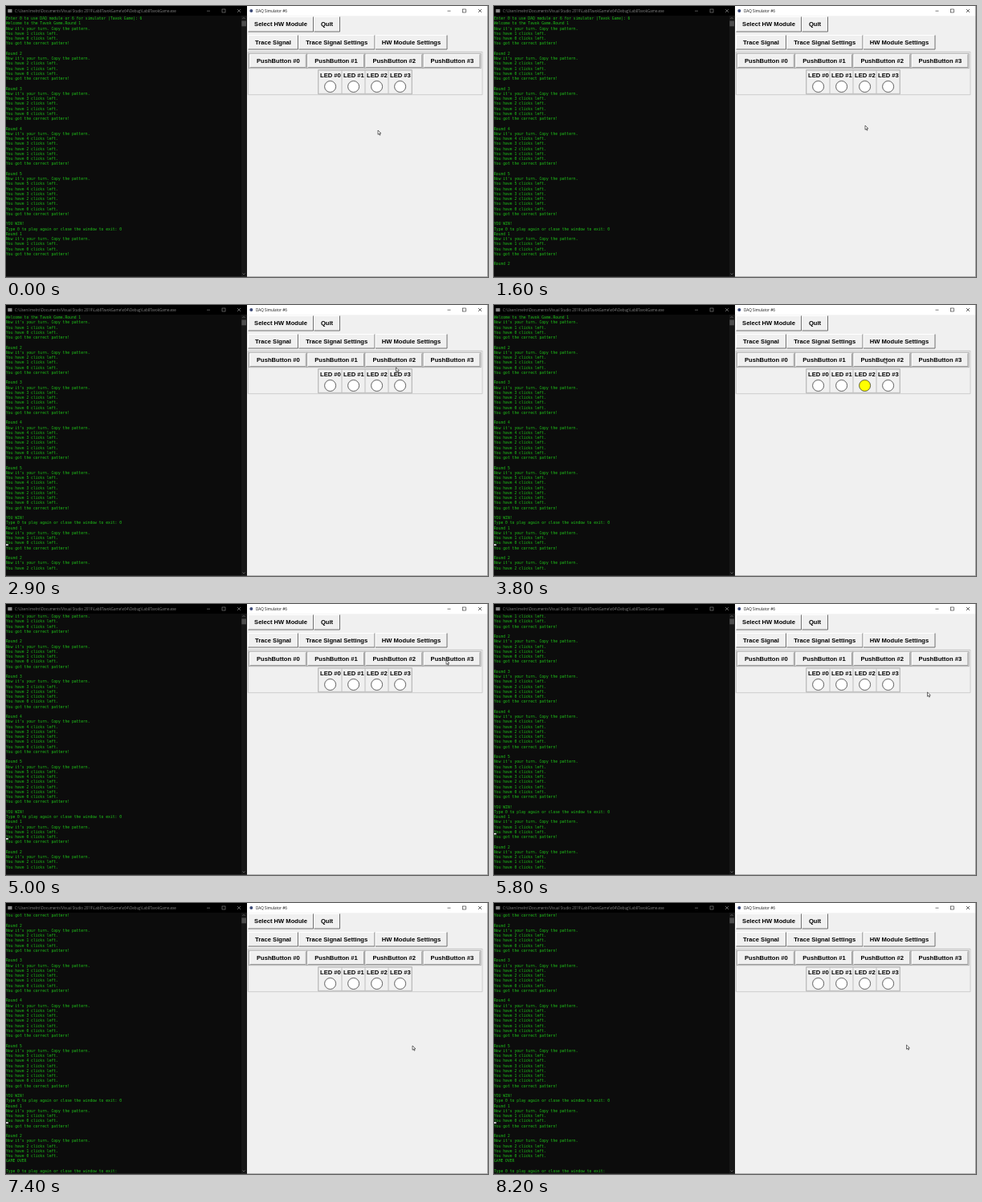
Write an HTML page with a canvas that moves like this. It is 600 px wide and 338 px high and loops after 8.3 s.

```html
<!DOCTYPE html>
<html lang="en">
<head>
<meta charset="utf-8">
<title>DAQ Simulator</title>
<style>
html, body { margin: 0; width: 100%; height: 100%; overflow: hidden; background: #0c0c0c; }
canvas { display: block; width: 600px; height: 338px; }
</style>
</head>
<body>
<canvas id="stage" width="600" height="338"></canvas>
<script>
const ctx = document.getElementById('stage').getContext('2d');
const LOOP = 8300, STEP = 100, ROW = 6.25, ROWS = 52;
const MONO = '"DejaVu Sans Mono", monospace';
const UI = '"Open Sans", sans-serif';
const BOLD = '"Liberation Sans", Arial, sans-serif';

// Console log
const clicks = n => Array.from({ length: n + 1 }, (_, i) => `You have ${n - i} clicks left.`);
const turn = n => ["Now it's your turn. Copy the pattern.", ...clicks(n)];
const won = n => [...turn(n), 'You got the correct pattern!', ''];
const again = 'Type 0 to play again or close the window to exit: ';
const log = [
  'Enter 0 to use DAQ module or 6 for simulator (Tavok Game): 6',
  'Welcome to the Tavok Game.Round 1', ...won(1)
];
for (let n = 2; n <= 5; n++) log.push('Round ' + n, ...won(n));
log.push('YOU WIN!', again + '0', 'Round 1', ...won(1), 'Round 2', ...turn(2), 'GAME OVER', '', again);

// [time, lines printed so far]
const prints = [[0, 48], [100, 50], [1900, 52], [4100, 53], [5800, 54], [5900, 55], [7400, 57]];
// [led, on, off]
const flashes = [[2, 100, 500], [1, 1000, 1500], [2, 3600, 4100], [3, 5400, 5800], [1, 6200, 7400]];
const ledColors = ['#00ff00', '#ff0000', '#ffff00', '#0000ff'];
// [button, down, up]
const presses = [[2, 3500, 3700], [3, 5300, 5500]];
// [time, x, y] of the pointer tip
const path = [
  [0, 463, 155], [1000, 463, 155], [1200, 462, 149], [1600, 462, 149], [2000, 480, 102],
  [2700, 482, 82], [2900, 485.5, 78], [3300, 486, 67], [4100, 486, 67], [4600, 548, 70],
  [5500, 548, 70], [6100, 531, 150], [6500, 531, 150], [6900, 506, 178], [7400, 506, 178],
  [8200, 513.5, 177], [8300, 513.5, 177]
];
const active = (list, id, t) => list.some(([k, a, b]) => k === id && t >= a && t < b);

function box(x, y, w, h, color) {
  ctx.fillStyle = color;
  ctx.fillRect(x, y, w, h);
}

// Laid out large and scaled down so that small sizes keep exact spacing
function text(str, x, y, size, font, color, align = 'left') {
  ctx.save();
  ctx.translate(x, y);
  ctx.scale(size / 50, size / 50);
  ctx.font = (font === BOLD ? 'bold ' : '') + '50px ' + font;
  ctx.textAlign = align;
  ctx.fillStyle = color;
  ctx.fillText(str, 0, 0);
  ctx.restore();
}

function stroke(color, width, ...lines) {
  ctx.strokeStyle = color;
  ctx.lineWidth = width;
  ctx.beginPath();
  for (const pts of lines) pts.forEach(([x, y], i) => i ? ctx.lineTo(x, y) : ctx.moveTo(x, y));
  ctx.stroke();
}

function bevel(x, y, w, h, light, dark, width = 0.8) {
  const r = x + w, b = y + h;
  stroke(light, width, [[x, b], [x, y], [r, y]]);
  stroke(dark, width, [[r, y], [r, b], [x, b]]);
}

function windowButtons(x, color) {
  stroke(color, 0.6,
    [[x - 2, 6.2], [x + 2, 6.2]],
    [[x + 36.5, 4], [x + 40.5, 4]], [[x + 36.5, 8.3], [x + 41, 8.3]],
    [[x + 37, 4], [x + 37, 8.3]], [[x + 41, 4], [x + 41, 8.3]]);
  // The close cross sits in its own slot
}

function cross(x, color) {
  stroke(color, 0.7, [[x - 2, 4], [x + 2, 8]], [[x + 2, 4], [x - 2, 8]]);
}

function titleControls(min, max, close, color) {
  stroke(color, 0.6, [[min - 2, 6.2], [min + 2, 6.2]]);
  ctx.strokeRect(max - 2, 4, 4, 4);
  cross(close, color);
}

function drawConsole(t) {
  box(0, 0, 300, 338, '#0c0c0c');
  box(0, 0, 300, 12, '#000');
  box(2.3, 4, 5.2, 4.2, '#8a8a8a');
  text('C:\\Users\\melro\\Documents\\Visual Studio 2019\\Lab8TavokGame\\x64\\Debug\\Lab8TavokGame.exe',
    11, 7.9, 4.45, UI, '#858585');
  titleControls(252, 271, 290, '#8c8c8c');

  const shown = prints.filter(p => p[0] <= t).pop()[1];
  const top = Math.max(0, Math.min(shown, log.length - 1) - ROWS + 1);
  const rowY = i => 12.4 + (i - top) * ROW;
  for (let i = top; i < shown; i++) text(log[i], 0, rowY(i) + 4.8, 4.69, MONO, '#1fc41a');
  if (top) box(0, rowY(46) + 4.7, 2.8, 1.6, '#f2f2f2');

  box(293, 12, 7, 326, '#171717');
  box(293.3, 18.5, 5.7, 6.8, '#4d4d4d');
  stroke('#777', 0.7, [[294.4, 16], [296, 14.4], [297.6, 16]], [[294.4, 333.4], [296, 335], [297.6, 333.4]]);
  box(0, 337.4, 300, 0.6, '#333');
}

function button(label, x, y, w, h) {
  bevel(x + 0.5, y + 0.5, w - 1, h - 1, '#fff', '#6e6e6e', 1);
  text(label, x + w / 2, y + h / 2 + 2.7, 7.6, BOLD, '#000', 'center');
}

function pushButton(i, t) {
  const x = 302.5 + i * 72.2, down = active(presses, i, t);
  ctx.strokeStyle = '#a6a6a6';
  ctx.lineWidth = 0.9;
  ctx.strokeRect(x, 59.3, 72, 18.4);
  bevel(x + 1.2, 60.5, 69.6, 16, down ? '#6e6e6e' : '#fff', down ? '#fff' : '#8a8a8a');
  const d = down ? 0.5 : 0;
  text('PushButton #' + i, x + 36.3 + d, 71.1 + d, 7.6, BOLD, '#000', 'center');
}

function led(i, t) {
  const x = 389 + i * 29;
  bevel(x, 80.3, 29, 29, '#c4c4c4', '#c4c4c4', 0.7);
  text('LED #' + i, x + 14.9, 89.4, 7.6, BOLD, '#000', 'center');
  ctx.beginPath();
  ctx.arc(x + 14.6, 100.5, 7, 0, Math.PI * 2);
  ctx.fillStyle = active(flashes, i, t) ? ledColors[i] : '#fff';
  ctx.fill();
  ctx.strokeStyle = '#222';
  ctx.lineWidth = 0.7;
  ctx.stroke();
}

function drawSimulator(t) {
  box(300, 0, 300, 338, '#f0f0f0');
  box(300, 0, 300, 12.3, '#fff');
  ctx.beginPath();
  ctx.arc(305.3, 6, 2, 0, Math.PI * 2);
  ctx.fillStyle = '#3c4a78';
  ctx.fill();
  text('DAQ Simulator #6', 311, 7.9, 4.65, UI, '#111');
  titleControls(551.5, 570.5, 590, '#222');

  button('Select HW Module', 301, 13, 82, 19.5);
  button('Quit', 383, 13, 33, 19.5);
  button('Trace Signal', 301, 36, 63, 18.5);
  button('Trace Signal Settings', 364, 36, 95.5, 18.5);
  button('HW Module Settings', 459.5, 36, 90, 18.5);

  bevel(301.3, 57.3, 291.7, 53.4, '#bdbdbd', '#cacaca', 0.9);
  bevel(388.6, 79.8, 116.8, 30, '#a8a8a8', '#a8a8a8');
  for (let i = 0; i < 4; i++) {
    pushButton(i, t);
    led(i, t);
  }
  box(599.3, 0, 0.7, 338, '#777');
  box(300, 337.3, 300, 0.7, '#999');
}

function drawPointer(t) {
  const n = path.findIndex(p => p[0] > t);
  const [t0, x0, y0] = path[n - 1], [t1, x1, y1] = path[n];
  const k = (t - t0) / (t1 - t0), e = k * k * (3 - 2 * k);
  ctx.save();
  ctx.translate(x0 + (x1 - x0) * e, y0 + (y1 - y0) * e);
  ctx.beginPath();
  [[0, 0], [0, 5.3], [1.3, 4.2], [2.2, 6.2], [3, 5.8], [2.2, 3.9], [3.9, 3.8]]
    .forEach(([x, y]) => ctx.lineTo(x, y));
  ctx.closePath();
  ctx.fillStyle = '#fff';
  ctx.fill();
  ctx.strokeStyle = '#111';
  ctx.lineWidth = 0.6;
  ctx.stroke();
  ctx.restore();
}

const start = performance.now();
function frame() {
  const t = Math.floor((performance.now() - start) % LOOP / STEP) * STEP;
  drawSimulator(t);
  drawConsole(t);
  drawPointer(t);
  requestAnimationFrame(frame);
}
frame();
</script>
</body>
</html>
```
